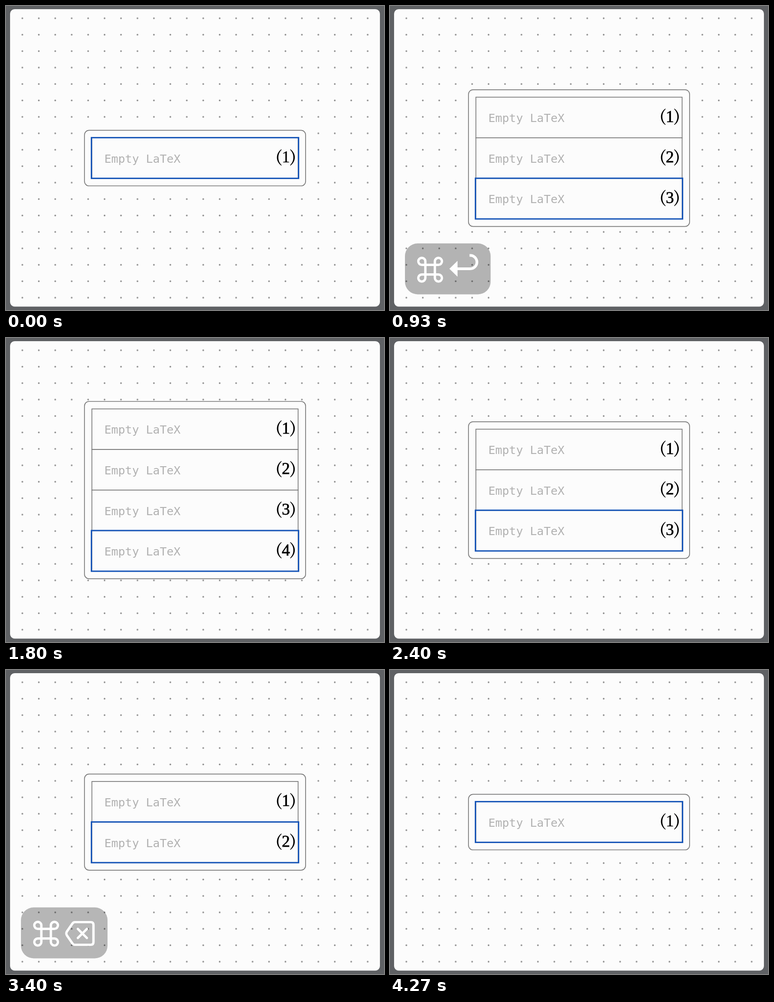
An HTML page that plays this animation: 834 by 671 pixels, repeating every 4400 ms.

```html
<!DOCTYPE html>
<html lang="en">
<head>
<meta charset="utf-8">
<title>Adding and removing rows</title>
<style>
  html, body { margin: 0; width: 100%; height: 100%; overflow: hidden; background: #5f6164; }
  svg { display: block; width: 834px; height: 671px; }
  .line { fill: #fcfcfc; stroke: #777; stroke-width: 1.7; }
  .hint { font: 25.4px "DejaVu Sans Mono", monospace; fill: #b1b1b1; }
  .digit { font: 36px "Liberation Serif", serif; text-anchor: middle; }
  .active { fill: none; stroke: #1655b8; stroke-width: 3; }
  .icon { fill: none; stroke: #fff; stroke-width: 5.2; stroke-linejoin: round; stroke-linecap: round; }
</style>
</head>
<body>
<svg viewBox="0 0 834 671">
  <defs>
    <pattern id="dots" x="18" y="9" width="36.28" height="36.28" patternUnits="userSpaceOnUse">
      <circle cx="18.1" cy="18.1" r="1.8" fill="#8c8c8c"/>
    </pattern>
    <path id="paren" d="M607.5 -18C594.5 -9 594.5 9 607.5 18L608.2 17C598.5 8 598.5 -8 608.2 -17Z"/>
    <g id="row">
      <rect class="line" x="189.5" y="-44.8" width="455" height="89.6"/>
      <text class="hint" x="217" y="10">Empty LaTeX</text>
      <use href="#paren" y="-1.5"/>
      <use href="#paren" y="-1.5" transform="matrix(-1 0 0 1 1235 0)"/>
    </g>
  </defs>
  <rect x="9" y="7" width="816" height="656.5" rx="10" fill="#fcfcfc"/>
  <rect x="18" y="9" width="798" height="652" fill="url(#dots)"/>
  <rect id="frame" class="line" x="173.2" width="487.8" rx="10"/>
  <g id="rows" stroke="#000"></g>
  <rect id="active" class="active" x="188.5" width="457" height="89.8"/>
  <g id="badge">
    <rect id="plate" x="33" y="524" height="112.5" rx="28" fill="#000" fill-opacity=".29"/>
    <path class="icon" d="M78 600.5V563.6A7.8 7.8 0 1 0 70.2 571.4H106.8A7.8 7.8 0 1 0 99 563.6V600.5A7.8 7.8 0 1 0 106.8 592.6H70.2A7.8 7.8 0 1 0 78 600.5Z"/>
    <g id="enter">
      <path d="M131 580L149 562.5V597.5Z" fill="#fff"/>
      <path d="M147 580H177A14.75 14.75 0 0 0 177 550.5H175.5" fill="none" stroke="#fff" stroke-width="6"/>
    </g>
    <path id="erase" class="icon" d="M152 556.5H187Q193 556.5 193 562.5V600.5Q193 606.5 187 606.5H152Q149 606.5 147 604L134.500 586Q131.500 581.500 134.500 577L147 559Q149 556.5 152 556.500ZM158.500 571.500L178.500 591.500M178.500 571.500L158.500 591.500"/>
  </g>
</svg>
<script>
  const LOOP = 4400, MIDDLE = 335.7, ROW = 89.6, PAD = 16.5;
  const presses = [
    { at: 200, rows: 2 }, { at: 700, rows: 3 }, { at: 1200, rows: 4 },
    { at: 2370, rows: 3, erase: true }, { at: 2970, rows: 2, erase: true }, { at: 3520, rows: 1, erase: true }
  ];
  const LAG = 65, HOLD = 360, FADE = 145; // badge timing after a key press

  const el = id => document.getElementById(id);
  const set = (node, attrs) => {
    for (const key in attrs) node.setAttribute(key, attrs[key]);
  };

  el("rows").innerHTML = [1, 2, 3, 4].map(n =>
    `<g><use href="#row" stroke="none"/><text class="digit" x="617.5" y="9.500">${n}</text></g>`).join("");
  const cells = [...el("rows").children];

  function drawRows(count) {
    const top = MIDDLE - count * ROW / 2;
    set(el("frame"), { y: top - PAD, height: count * ROW + 2 * PAD });
    set(el("active"), { y: top + (count - 1) * ROW - 0.3 });
    set(el("rows"), { "stroke-width": count > 1 ? 0.8 : 0.3 });
    cells.forEach((cell, i) => set(cell, {
      transform: `translate(0 ${top + (i + 0.5) * ROW})`,
      display: i < count ? "inline" : "none"
    }));
  }

  function drawBadge(t) {
    const press = presses.findLast(p => p.at + LAG <= t);
    const age = press ? t - press.at - LAG : Infinity;
    const opacity = Math.max(0, Math.min(1, 1 - (age - HOLD) / FADE));
    const erase = !!(press && press.erase);
    set(el("badge"), { opacity });
    set(el("plate"), { width: erase ? 191 : 189 });
    set(el("enter"), { display: erase ? "none" : "inline" });
    set(el("erase"), { display: erase ? "inline" : "none" });
  }

  function frame() {
    const t = performance.now() % LOOP;
    const last = presses.findLast(p => p.at <= t);
    drawRows(last ? last.rows : 1);
    drawBadge(t);
    requestAnimationFrame(frame);
  }
  frame();
</script>
</body>
</html>
```
